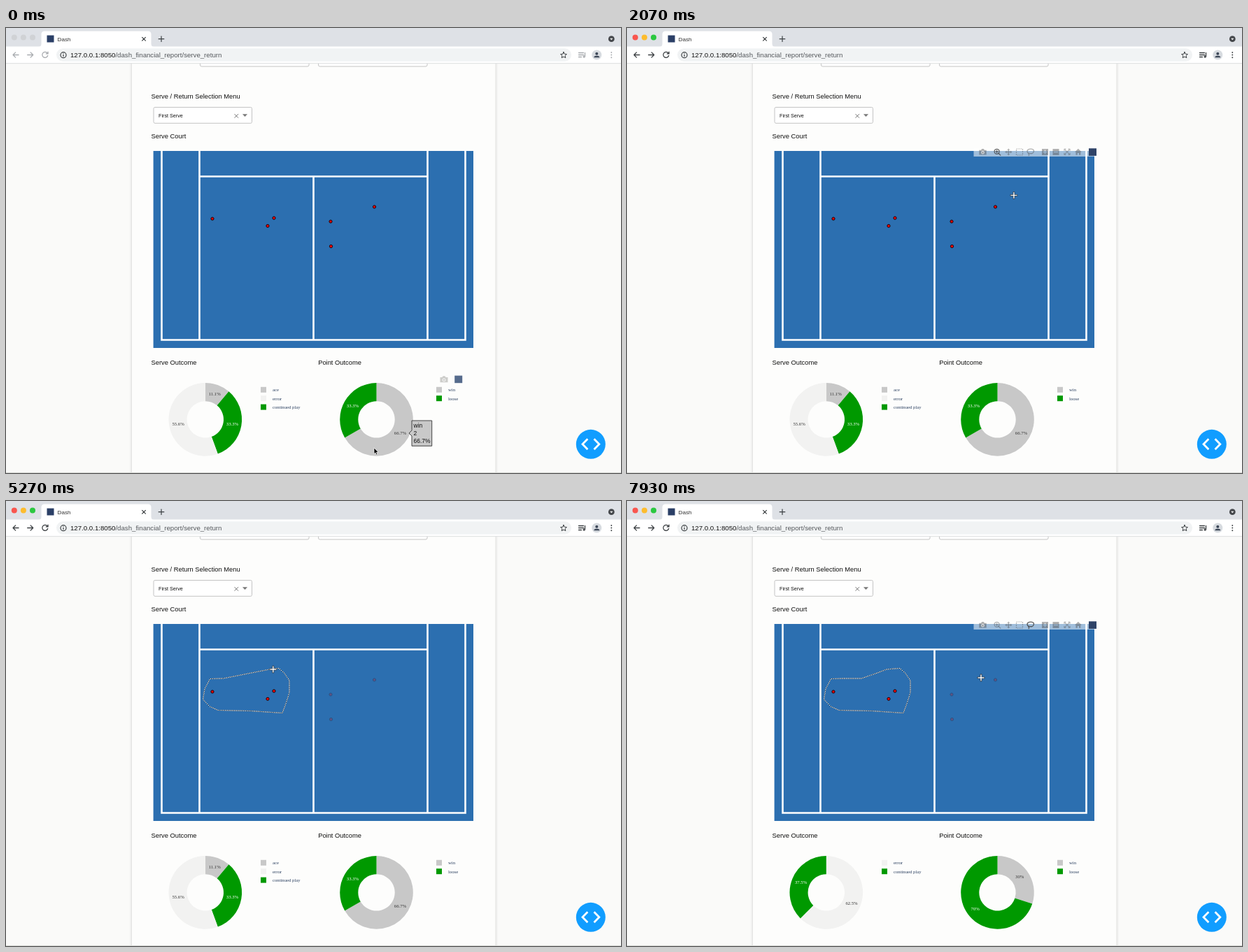
Animation, 879 px wide and 637 px high, one loop 8 s. Source, as an HTML page:

```html
<!DOCTYPE html>
<html lang="en">
<head>
<meta charset="utf-8">
<title>Dash</title>
<style>
html, body { margin: 0; width: 100%; height: 100%; overflow: hidden; background: #fafaf9; }
svg { display: block; width: 100%; height: 100%; }
text { font-family: "Liberation Sans", Arial, sans-serif; fill: #111; white-space: pre; }
.head { font-size: 9.33px; }
.serif text { font-family: "Liberation Serif", Times, serif; font-size: 6.7px; fill: #2a3f5f; }
.line { fill: none; stroke-linecap: round; stroke-linejoin: round; }
</style>
</head>
<body>
<svg viewBox="0 0 879 637" xmlns="http://www.w3.org/2000/svg">
  <defs>
    <filter id="soft" x="-5%" y="-5%" width="110%" height="110%"><feGaussianBlur stdDeviation="2"/></filter>
    <g id="camera">
      <path d="M-5.5-3h3l1-1.7h3l1 1.7h3v7.3h-11z"/>
      <circle cy=".7" r="2.5" fill="#fff" fill-opacity=".7"/><circle cy=".7" r="1.3"/>
    </g>
  </defs>

  <!-- page -->
  <rect width="879" height="637" fill="#fafaf9"/>
  <rect x="180" y="40" width="519.5" height="610" fill="#000" opacity=".2" filter="url(#soft)"/>
  <rect x="180" y="40" width="519.5" height="610" fill="#fdfdfc"/>
  <g fill="#fff" stroke="#c4c4c4">
    <rect x="277.5" y="30" width="155.5" height="25" rx="2"/>
    <rect x="446.5" y="30" width="155.5" height="25" rx="2"/>
    <rect x="211" y="113.5" width="140.5" height="22.8" rx="2"/>
  </g>
  <path class="line" d="M326.8 123.4l5 5m0-5l-5 5" stroke="#777" stroke-width="1"/>
  <path d="M338 123.3h7l-3.5 3.6z" fill="#777"/>
  <text x="218" y="127.7" font-size="7.2">First Serve</text>
  <g class="head">
    <text x="207.6" y="101">Serve / Return Selection Menu</text>
    <text x="207.6" y="157.8">Serve Court</text>
    <text x="207.6" y="482.3">Serve Outcome</text>
    <text x="446.2" y="482.3">Point Outcome</text>
  </g>

  <!-- court -->
  <rect x="210.6" y="176" width="457.4" height="282" fill="#2c6fb0"/>
  <path d="M222.5 176V446.5H656.5V176M276.5 176V446.5M602.5 176V446.5M276.5 212.5H602.5M439.5 212.5V446.5" fill="none" stroke="#fff" stroke-width="2.6"/>
  <g id="dots"></g>
  <g id="lasso" class="line" stroke-width="1">
    <path stroke="#fff"/><path stroke="#111" stroke-dasharray="1.3 1.3" style="stroke-linecap:butt"/>
  </g>

  <!-- chart toolbar -->
  <g id="bar">
    <rect x="495.5" y="172" width="175.5" height="12" fill="#fff" fill-opacity=".55"/>
    <g fill="#444" fill-opacity=".42" stroke="none">
      <use href="#camera" transform="translate(508.5 177.5) scale(.95)"/>
      <path d="M545.3 172.4l2 2.4h-1.3v2h2v-1.3l2.4 2-2.4 2v-1.3h-2v2h1.3l-2 2.4-2-2.4h1.3v-2h-2v1.3l-2.4-2 2.4-2v1.3h2v-2h-1.3z"/>
      <path d="M593 173h9v9h-9zM597 174.5v2.5h-2.5v1H597v2.5h1V178h2.5v-1H598v-2.5z" fill-rule="evenodd"/>
      <path d="M608.5 173h9v9h-9zM610 177v1h6v-1z" fill-rule="evenodd"/>
      <path d="M640 177.6l4.9-4.8 4.9 4.8h-1.5v4.2h-2.3v-2.8h-2.2v2.8h-2.3v-4.2z"/>
    </g>
    <g class="line" stroke="#444" stroke-opacity=".42" stroke-width="1.2">
      <rect x="556.5" y="173" width="9" height="9" stroke-dasharray="1.7 1.3" style="stroke-linecap:butt"/>
      <path d="M625 175.3v-2h2m4 0h2v2m0 4v2h-2m-4 0h-2v-2M626.5 174.8l5 5m0-5l-5 5"/>
    </g>
    <g id="zoom" class="line" stroke="#444" stroke-width="1.3">
      <circle cx="528.6" cy="176.8" r="3.5"/><path d="M531.2 179.5l2.6 2.6M527 176.8h3.2m-1.6-1.6v3.2"/>
    </g>
    <path id="loop" class="line" stroke="#444" stroke-width="1.3" d="M574.5 179.4c-3.3-1.2-3.5-5.2.6-6.1 4-.9 7.2 1 6.2 3.8-.9 2.4-3.6 3-6 2.3-1.3-.4-2 .8-1 1.3.8.4.6 1.1-.2 1.8"/>
    <rect x="660" y="172.3" width="11" height="10.6" fill="#2f4368"/>
  </g>
  <g id="tip">
    <path d="M526 187h37l3-3 3 3h19v18h-62z" fill="#666b70" fill-opacity=".7"/>
    <text x="532.6" y="199.2" font-size="7.7" style="font-family:'DejaVu Sans',Verdana,sans-serif;fill:#e3e9ef">Lasso Select</text>
  </g>

  <!-- pies -->
  <g id="before" class="serif"></g>
  <g id="after" class="serif"></g>
  <g id="pieBar">
    <use href="#camera" transform="translate(626 503)" fill="#cdcdca"/>
    <rect x="641.2" y="497.6" width="11" height="10.6" fill="#566b8c"/>
  </g>
  <g id="hover">
    <path d="M580 562h28.7v36.3H580V584l-4-4 4-4z" fill="#c9c9c9" stroke="#444"/>
    <g font-size="8.5"><text x="582.5" y="572">win</text><text x="582.5" y="583">2</text><text x="582.5" y="594">66.7%</text></g>
  </g>
  <circle cx="835.8" cy="595.8" r="21" fill="#119dff"/>
  <path d="M831.3 588.3l-7.3 7.5 7.3 7.5M840.5 588.3l7.3 7.5-7.3 7.5" fill="none" stroke="#fff" stroke-width="2.8"/>

  <!-- browser -->
  <rect width="879" height="28" fill="#dee1e6"/>
  <path d="M46 27q4.5 0 4.5-4.500V9q0-4.500 4.500-4.500H203q4.500 0 4.500 4.500V22.500Q207.500 27 212 27z" fill="#fff"/>
  <rect y="26.500" width="879" height="24" fill="#fff"/>
  <rect x="72" y="29.300" width="736" height="18.500" rx="9.200" fill="#f1f3f4"/>
  <path d="M0 50.700H879" stroke="#dcdedf"/>
  <rect x="58.500" y="10.500" width="10" height="10" fill="#2b3f66"/>
  <text x="73.600" y="18.600" font-size="8.100" style="fill:#333">Dash</text>
  <text x="92" y="41.700" font-size="9.660">127.0.0.1:8050<tspan fill="#55585c">/dash_financial_report/serve_return</tspan></text>
  <g class="line" stroke="#3c4043" stroke-width="1.200">
    <path d="M194.600 13.300l4.800 4.800m0-4.800l-4.800 4.800M218.200 15.700h7.600m-3.800-3.800v7.600"/>
    <circle cx="82" cy="38.700" r="4"/><path d="M82 38.300v2.300M82 36.500v.1"/>
    <path d="M797 34.300l1.300 2.900 3.100.3-2.300 2.100.7 3.100-2.800-1.600-2.800 1.600.7-3.100-2.300-2.100 3.100-.3z" stroke-width="1"/>
  </g>
  <circle cx="865.300" cy="15.700" r="4.400" fill="#45484c"/>
  <path d="M863.200 14.700h4.200l-2.100 2.500z" fill="#fff"/>
  <circle cx="844.300" cy="38.500" r="7" fill="#d7dbe0"/>
  <path d="M840.400 42.300v-.8c0-2.500 7.800-2.500 7.800 0v.8z" fill="#3c4757"/><circle cx="844.300" cy="36.700" r="2" fill="#3c4757"/>
  <g id="nav" class="line" stroke-width="1.300">
    <path d="M18 38.500h-8m3.600-3.600L10 38.500l3.600 3.600M30.700 38.500h8m-3.600-3.600l3.600 3.600-3.600 3.600M59.200 36.200a4 4 0 1 0 .5 3.300M60 34.200v2.700h-2.700"/>
    <path d="M818.500 35.500h7m-7 3h7m-7 3h4M827.500 35.500v5"/><circle cx="826.200" cy="41" r="1.100"/>
    <path d="M865.300 34.900v.1m0 3.500v.1m0 3.500v.1" stroke-width="1.900"/>
  </g>
  <g id="lights"><circle cx="11.800" cy="13.600" r="4"/><circle cx="24.900" cy="13.600" r="4"/><circle cx="38" cy="13.600" r="4"/></g>
  <path d="M0 636.500H879" stroke="#d9dbd7"/>

  <!-- pointers -->
  <g id="arrow"><path d="M0 0V8.700L2 6.900 3.400 10.100 4.900 9.400 3.500 6.300H6.200Z" fill="#000" stroke="#fff" stroke-width=".7"/></g>
  <g id="cross"><path d="M-1-5H1V-1H5V1H1V5H-1V1H-5V-1H-1Z" fill="#fff" fill-opacity=".75" stroke="#333" stroke-width=".7"/><path d="M0-4V4M-4 0H4" stroke="#fff" stroke-width=".8"/></g>
  <g id="resize"><path d="M-5 0L-2-3V-.8H2V-3L5 0 2 3V.8H-2V3Z" fill="#000" stroke="#fff" stroke-width=".6"/></g>
</svg>
<script>
const LOOP = 8000, ACTIVE = 500, PRESS = 3600, RELEASE = 5700, UPDATE = 6050;
const NS = 'http://www.w3.org/2000/svg';
const $ = id => document.getElementById(id);

function add(parent, tag, attrs, label) {
  const el = document.createElementNS(NS, tag);
  for (const k in attrs) el.setAttribute(k, attrs[k]);
  if (label) el.textContent = label;
  parent.appendChild(el);
  return el;
}

const clamp = v => Math.max(0, Math.min(1, v));
const ramp = (t, from, to) => clamp((t - from) / (to - from));
const ease = u => u * u * (3 - 2 * u);
const show = (id, on) => { $(id).style.display = on ? '' : 'none'; };

// pies
const GREY = '#c8c8c8', PALE = '#f2f2f1', GREEN = '#009900';
const R = 52.3, HOLE = 26.2, CY = 560.4;

function pie(parent, cx, slices) {
  const at = (r, f) => [cx + r * Math.sin(f * 2 * Math.PI), CY - r * Math.cos(f * 2 * Math.PI)];
  let from = 0;
  for (const [part, color, label] of slices) {
    const to = from + part, big = part > .5 ? 1 : 0;
    add(parent, 'path', { fill: color, d:
      `M${at(R, from)}A${R} ${R} 0 ${big} 1 ${at(R, to)}L${at(HOLE, to)}A${HOLE} ${HOLE} 0 ${big} 0 ${at(HOLE, from)}Z` });
    const [x, y] = at((R + HOLE) / 2, from + part / 2);
    add(parent, 'text', { x, y: y + 2.2, 'text-anchor': 'middle',
      style: `fill:${color === GREEN ? '#fff' : '#333'}` }, label);
    from = to;
  }
}

function legend(parent, x, rows) {
  rows.forEach(([color, label], i) => {
    const y = 517.8 + i * 12.4;
    add(parent, 'rect', { x, y: y - 4, width: 8, height: 8, fill: color });
    add(parent, 'text', { x: x + 17, y: y + 2.3 }, label);
  });
}

const ACE = [GREY, 'ace'], ERROR = [PALE, 'error'], PLAY = [GREEN, 'continued play'];
const POINT = [[GREY, 'win'], [GREEN, 'loose']];

pie($('before'), 284.8, [[1 / 9, GREY, '11.1%'], [3 / 9, GREEN, '33.3%'], [5 / 9, PALE, '55.6%']]);
pie($('before'), 529.5, [[2 / 3, GREY, '66.7%'], [1 / 3, GREEN, '33.3%']]);
legend($('before'), 364, [ACE, ERROR, PLAY]);
legend($('before'), 615, POINT);
pie($('after'), 284.8, [[.625, PALE, '62.5%'], [.375, GREEN, '37.5%']]);
pie($('after'), 529.5, [[.3, GREY, '30%'], [.7, GREEN, '70%']]);
legend($('after'), 364, [ERROR, PLAY]);
legend($('after'), 615, POINT);

// serves
const serves = [[295, 273], [383, 272], [374, 283.3], [464, 277], [526.5, 256], [464.5, 312.5]]
  .map(([cx, cy]) => ({ x: cx, y: cy,
    el: add($('dots'), 'circle', { cx, cy, r: 2.1, fill: '#f00', stroke: '#200', 'stroke-width': 1 }) }));

// pointer: [time, x, y], eased outside the drag and linear along it
const before = [[0, 526, 601], [650, 526, 601], [1400, 552, 242], [2000, 552, 242], [2600, 576, 178],
  [2850, 576, 178], [3060, 560, 194], [3500, 310, 254], [PRESS, 310, 254]];
const drag = [[PRESS, 310, 254], [3930, 291.5, 254.5], [4030, 284, 269], [4120, 281.5, 284], [4210, 291, 294],
  [4300, 303, 299.5], [4460, 350, 300.5], [4640, 395, 303.5], [4740, 401, 287], [4820, 405, 274],
  [4950, 405, 257], [5060, 398, 246.5], [5150, 390, 239.5], [5270, 382, 240], [5340, 371, 241],
  [5420, 358, 246], [5560, 335, 254], [RELEASE, 310, 254]];
const after = [[RELEASE, 310, 254], [5850, 310, 254], [6500, 319, 467], [6950, 319, 467],
  [7750, 506, 253], [LOOP, 506, 253]];

function along(keys, t, curve) {
  let i = 1;
  while (i < keys.length - 1 && keys[i][0] < t) i++;
  const [t0, x0, y0] = keys[i - 1], [t1, x1, y1] = keys[i];
  const u = curve(ramp(t, t0, t1));
  return [x0 + (x1 - x0) * u, y0 + (y1 - y0) * u];
}

function pointer(t) {
  if (t < PRESS) return along(before, t, ease);
  return t < RELEASE ? along(drag, t, u => u) : along(after, t, ease);
}

function inside({ x, y }, shape) {
  let hit = false;
  shape.forEach(([x1, y1], i) => {
    const [x2, y2] = shape[(i + 1) % shape.length];
    if (y1 > y !== y2 > y && x < x1 + (x2 - x1) * (y - y1) / (y2 - y1)) hit = !hit;
  });
  return hit;
}

function drawLasso(t) {
  const on = t > PRESS;
  show('lasso', on);
  const shape = drag.filter(k => k[0] <= t).map(k => k.slice(1));
  if (on && t < RELEASE) shape.push(pointer(t));
  const d = on ? 'M' + shape.join('L') + 'Z' : '';
  for (const path of $('lasso').children) path.setAttribute('d', d);
  for (const s of serves) s.el.setAttribute('opacity', !on || inside(s, shape) ? 1 : .25);
}

function drawPointer(t) {
  const [x, y] = pointer(t);
  const kind = y > 476 ? 'arrow' : y > 459 ? 'resize' : 'cross';
  for (const id of ['arrow', 'resize', 'cross']) show(id, id === kind);
  $(kind).setAttribute('transform', `translate(${x} ${y + (kind === 'cross' && t > PRESS && t < RELEASE ? 1 : 0)})`);
}

function drawWindow(t) {
  const active = t >= ACTIVE;
  const colors = active ? ['#f9564f', '#fdbc2e', '#2bc840'] : ['#d0d2d5', '#d0d2d5', '#d0d2d5'];
  [...$('lights').children].forEach((c, i) => c.setAttribute('fill', colors[i]));
  $('nav').setAttribute('stroke', active ? '#3c4043' : '#a9acb0');
}

function render(t) {
  drawWindow(t);
  show('hover', t < 860);
  $('pieBar').setAttribute('opacity', 1 - ramp(t, 900, 1200));
  const fadeIn = ramp(t, 1130, 1430), fadeOut = ramp(t, PRESS, PRESS + 300), back = ramp(t, RELEASE, RELEASE + 300);
  $('bar').setAttribute('opacity', Math.max(fadeIn * (1 - fadeOut), back));
  const pick = ramp(t, 2850, 3150);
  $('zoom').setAttribute('stroke-opacity', .8 - .4 * pick);
  $('loop').setAttribute('stroke-opacity', .42 + .43 * pick);
  $('tip').setAttribute('opacity', ramp(t, 2480, 2650) * (1 - ramp(t, 2900, 3150)));
  show('before', t < UPDATE);
  show('after', t >= UPDATE);
  drawLasso(t);
  drawPointer(t);
}

function tick(now) {
  render(now % LOOP);
  requestAnimationFrame(tick);
}
render(0);
requestAnimationFrame(tick);
</script>
</body>
</html>
```
